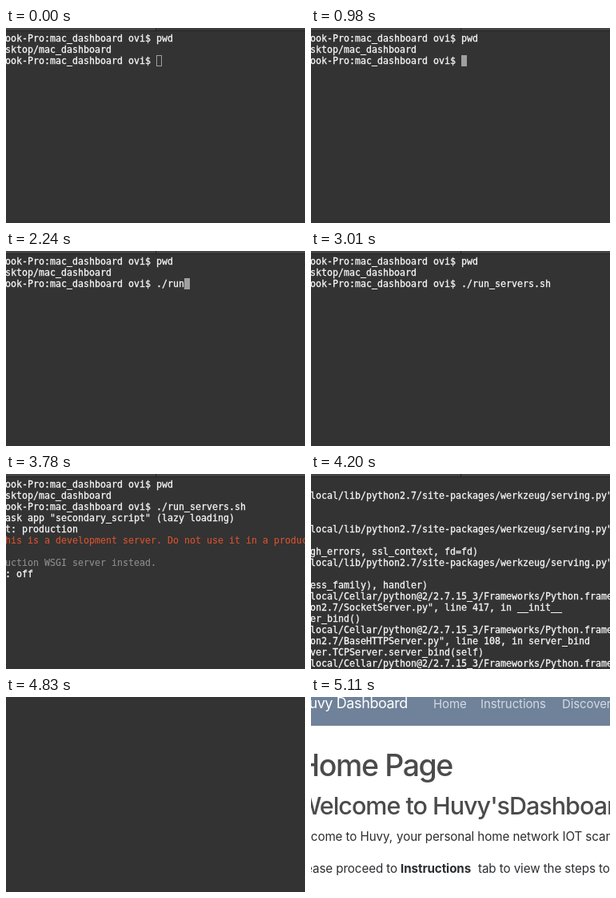
An HTML page for the animation above (5.53 s loop, 374x244 px).

```html
<!DOCTYPE html>
<html lang="en">
<head>
<meta charset="utf-8">
<title>Terminal to dashboard</title>
<style>
  html, body { margin: 0; width: 100%; height: 100%; overflow: hidden; background: #333; }
  #stage { position: relative; width: 374px; height: 244px; overflow: hidden; }
  #stage * { animation-duration: 5530ms; animation-timing-function: step-end; animation-iteration-count: infinite; }

  pre, .cmd, .cursor, .bar, .bar i, .page { position: absolute; }
  pre, .cmd {
    margin: 0; top: 6px; left: -1px;
    font: 11.63px/14px "DejaVu Sans Mono", monospace;
    color: #f6f6f6; -webkit-text-stroke: .3px; white-space: pre;
  }
  .warn { color: #d9532f; -webkit-text-stroke: .1px; }
  .dim { color: #8e8e8e; -webkit-text-stroke: .1px; }

  .bar { left: 0; top: 0; width: 374px; height: 3px; background: #444; border-bottom: 1px solid #242424; animation-name: terminal; }
  .bar i { left: 187px; top: 0; width: 187px; height: 3px; box-sizing: border-box; border-left: 1px solid #222; animation-name: focus-tab; }

  .shell { animation-name: shell; }
  .output { animation-name: output; }
  .trace { animation-name: trace; }
  .cmd { left: 188px; top: 34px; height: 14px; overflow: hidden; animation-name: typing, shell; }
  .cursor {
    left: 188px; top: 34px; width: 7px; height: 14px; box-sizing: border-box;
    border: 1px solid #a0a0a0; animation-name: cursor, focus-cursor;
  }
  .page { inset: 0; animation-name: page; }
  .page text { font-family: Inter, "Open Sans", sans-serif; }

  @keyframes terminal { 0% { visibility: visible } 87.34%, 100% { visibility: hidden } }
  @keyframes shell { 0% { visibility: visible } 75.94%, 100% { visibility: hidden } }
  @keyframes output { 0% { visibility: hidden } 60.75% { visibility: visible } 75.94%, 100% { visibility: hidden } }
  @keyframes trace { 0% { visibility: hidden } 75.94% { visibility: visible } 87.34%, 100% { visibility: hidden } }
  @keyframes page { 0% { visibility: hidden } 92.4%, 100% { visibility: visible } }
  @keyframes focus-tab { 0% { background: #3b3b3b } 16.45%, 100% { background: #444 } }
  @keyframes focus-cursor { 0% { background: transparent } 16.45%, 100% { background: #a0a0a0 } }
  @keyframes typing {
    0% { width: 0 }
    22.78% { width: 7px }
    25.31% { width: 14px }
    31.64% { width: 21px }
    35.44% { width: 28px }
    40.5% { width: 35px }
    44.3%, 100% { width: 119px }
  }
  @keyframes cursor {
    0% { transform: none; visibility: visible }
    22.78% { transform: translateX(7px) }
    25.31% { transform: translateX(14px) }
    31.64% { transform: translateX(21px) }
    35.44% { transform: translateX(28px) }
    40.5% { transform: translateX(35px) }
    44.3% { transform: translateX(119px); visibility: visible }
    54.42%, 100% { transform: translateX(119px); visibility: hidden }
  }
</style>
</head>
<body>
<div id="stage">
  <div class="bar"><i></i></div>

<pre class="shell">ook-Pro:mac_dashboard ovi$ pwd
sktop/mac_dashboard
ook-Pro:mac_dashboard ovi$</pre>
  <div class="cursor"></div>
  <div class="cmd">./run_servers.sh</div>

<pre class="output" style="top:48px">ask app "secondary_script" (lazy loading)
t: production
<span class="warn">his is a development server. Do not use it in a production</span>

<span class="dim">uction WSGI server instead.</span>
: off</pre>

<pre class="trace" style="top:20px">local/lib/python2.7/site-packages/werkzeug/serving.py"


local/lib/python2.7/site-packages/werkzeug/serving.py"

gh_errors, ssl_context, fd=fd)
local/lib/python2.7/site-packages/werkzeug/serving.py"

ess_family), handler)
local/Cellar/python@2/2.7.15_3/Frameworks/Python.framework
on2.7/SocketServer.py", line 417, in __init__
er_bind()
local/Cellar/python@2/2.7.15_3/Frameworks/Python.framework
on2.7/BaseHTTPServer.py", line 108, in server_bind
ver.TCPServer.server_bind(self)
local/Cellar/python@2/2.7.15_3/Frameworks/Python.framework</pre>

  <svg class="page" width="374" height="244" viewBox="0 0 374 244">
    <rect width="374" height="244" fill="#fff"/>
    <rect width="374" height="36" fill="#708299"/>
    <text x="121" y="14" text-anchor="end" font-size="18" letter-spacing="-.4" fill="#fff">Huvy Dashboard</text>
    <g font-size="15" letter-spacing="-.1" fill="#d3dae1">
      <text x="153" y="14">Home</text>
      <text x="212" y="14">Instructions</text>
      <text x="314" y="14">Discovery</text>
    </g>
    <g font-weight="500" fill="#4b4b4b">
      <text x="177" y="99" text-anchor="end" font-size="37.5" letter-spacing="-1.4">Home Page</text>
      <g font-size="30.5" letter-spacing="-1">
        <text x="145" y="147" text-anchor="end">Welcome to</text>
        <text x="152" y="147">Huvy's</text>
        <text x="248" y="147">Dashboard</text>
      </g>
    </g>
    <g font-size="15.2" letter-spacing="-.1" fill="#2b2d30">
      <text x="102" y="180" text-anchor="end">Welcome to Huvy,</text>
      <text x="107" y="180">your personal home network IOT scanner</text>
      <text x="108" y="220" text-anchor="end">Please proceed to</text>
      <text x="112" y="220" font-weight="700">Instructions</text>
      <text x="209" y="220">tab to view the steps to</text>
    </g>
  </svg>
</div>
</body>
</html>
```
